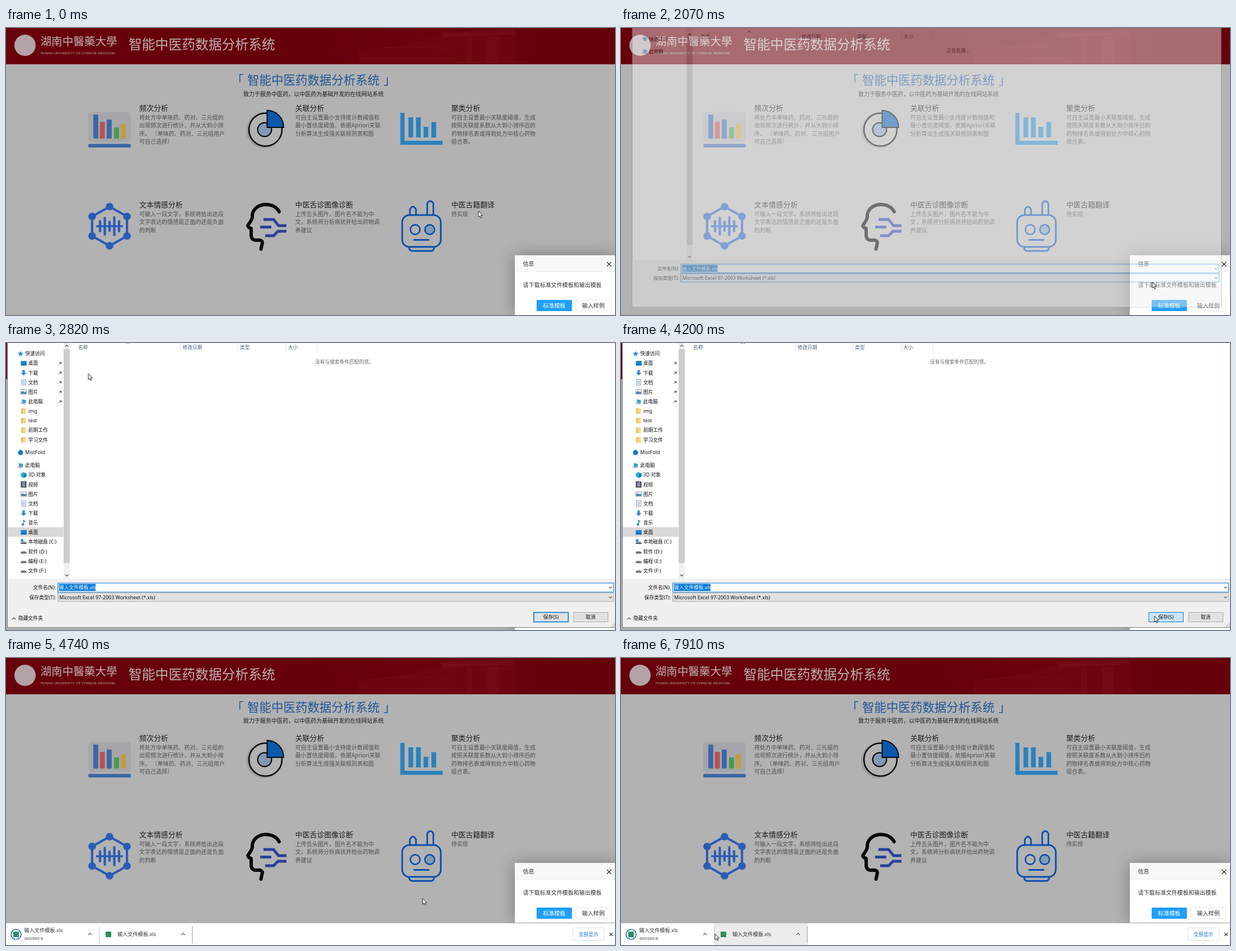
An HTML page that plays this animation: 1088 px wide and 514 px high, repeating every 7.99 s.

```html
<!DOCTYPE html>
<html lang="zh-CN">
<head>
<meta charset="utf-8">
<title>智能中医药数据分析系统</title>
<style>
html,body{margin:0;width:100%;height:100%;overflow:hidden;background:#b2b2b2}
svg{display:block;width:100vw;height:100vh}
text{font-family:"Noto Sans","Noto Sans CJK SC","Noto Sans CJK",sans-serif;white-space:pre}
.cjk text{font-family:"Noto Sans CJK SC","Noto Sans CJK",sans-serif}
</style>
</head>
<body>
<svg id="stage" viewBox="0 0 1088 514" preserveAspectRatio="none"></svg>
<script>
const LOOP = 7990;

// y is the vertical middle of the line
const T = (x, y, s, size, fill, anchor = 'start', weight = 400) =>
  `<text x="${x}" y="${(y + size * .37).toFixed(2)}" font-size="${size}" fill="${fill}" text-anchor="${anchor}" font-weight="${weight}">${s}</text>`;
const R = (x, y, w, h, fill, extra = '') =>
  `<rect x="${x}" y="${y}" width="${w}" height="${h}" fill="${fill}" ${extra}/>`;
const C = (x, y, r, fill, extra = '') =>
  `<circle cx="${x}" cy="${y}" r="${r}" fill="${fill}" ${extra}/>`;
const L = (d, stroke, w = 1, extra = '') =>
  `<path d="${d}" fill="none" stroke="${stroke}" stroke-width="${w}" ${extra}/>`;
const F = (d, fill, extra = '') => `<path d="${d}" fill="${fill}" ${extra}/>`;
const G = (id, body, extra = '') => `<g id="${id}" ${extra}>${body}</g>`;
const cross = (x, y, r, c, w) => L(`M${x - r} ${y - r}l${2 * r} ${2 * r}m0 ${-2 * r}l${-2 * r} ${2 * r}`, c, w);
const chev = (x, y, r, up, c = '#444') => L(`M${x - r} ${y + (up ? r : -r) / 2}l${r} ${up ? -r : r}l${r} ${up ? r : -r}`, c, 1.1);

function header() {
  return R(0, 0, 1088, 65, 'url(#red)') +
    F('M630 65V42Q700 34 745 22L790 10H912V65Z', '#8a2026', 'opacity=".12"') +
    F('M775 8L905 2L912 11L782 17Z', '#8f2a2e', 'opacity=".2"') +
    R(822, 17, 11, 48, '#8f2a2e', 'opacity=".16"') + R(860, 15, 20, 50, '#8f2a2e', 'opacity=".16"') +
    L('M636 40Q720 28 800 38M632 54H800', '#8f3a3a', 1, 'opacity=".2"') +
    C(34, 31, 19, '#b3a3a5') +
    T(61.5, 24, '湖南中醫藥大學', 19.6, '#bdb0b1') +
    `<text x="61.5" y="47.3" font-size="6.25" fill="#b5a5a6" style="font-family:'Liberation Sans',sans-serif">HUNAN UNIVERSITY OF CHINESE MEDICINE</text>` +
    T(219, 29.5, '智能中医药数据分析系统', 23.8, '#bdb0b1', 'start', 350);
}

const cards = [
  ['频次分析', '将处方中单味药、药对、三元组的|出现频次进行统计，并从大到小排|序。 （单味药、药对、三元组用户|可自己选择）'],
  ['关联分析', '可自主设置最小支持度计数阈值和|最小置信度阈值，依据Apriori关联|分析算法生成强关联规则表和图'],
  ['聚类分析', '可自主设置最小关联度阈值，生成|按照关联度系数从大到小排序后的|药物排名表或得到处方中核心药物|组合表。'],
  ['文本情感分析', '可输入一段文字，系统将给出这段|文字表达的情感是正面的还是负面|的判断'],
  ['中医舌诊图像诊断', '上传舌头图片，图片名不能为中|文，系统将分析病状并给出药物调|养建议'],
  ['中医古籍翻译', '待实现']
].map(([head, body], i) => {
  const x = 238 + (i % 3) * 278.7, y = i < 3 ? 143 : 316;
  return T(x, y, head, 12.95, '#1c1c1c', 'start', 350) +
    body.split('|').map((s, k) => T(x, y + 17.3 + k * 14.3, s, 10.05, '#4e4e4e', 'start', 300)).join('');
}).join('');

function icons() {
  const bars = [[156, 155, '#3c66a6'], [167.7, 168, '#b8524e'], [180, 164, '#3c66a6'], [193, 178, '#479a52'], [205.3, 172, '#c39b42']];
  const freq = R(147, 150.5, 76, 54, '#a5a6a9', 'rx="6"') +
    bars.map(([x, y, c]) => R(x, y, 8.8, 198 - y, c, 'rx="1"')).join('') + R(147, 207.5, 76, 6.6, '#3c66a6', 'rx="2.5"');
  const pie = C(461, 183.5, 32, '#9d9d9d') + C(463.5, 182, 29.5, '#b2b2b2', 'stroke="#0a0a0a" stroke-width="2.6"') +
    C(462, 182, 12.4, '#8297b4', 'stroke="#0a0a0a" stroke-width="2.2"') +
    F('M466.5 178V147.5A30 30 0 0 1 496 178Z', '#0b58a8', 'stroke="#0a0a0a" stroke-width="2"');
  const chart = [[719, 160], [732.5, 160], [746, 177], [760, 168.5]].map(([x, y]) => R(x, y, 8.4, 196 - y, '#2a81bd')).join('') +
    F('M704.5 152H712V202H780V209.3H704.5Z', '#2a81bd');
  const blue = '#2a5cb6';
  const hex = Array.from({length: 6}, (_, i) => {
    const a = i * Math.PI / 3;
    return [185 + 36 * Math.sin(a), 355 - 35 * Math.cos(a)];
  });
  const net = L('M' + hex.join('L') + 'Z', blue, 4.2) + hex.map(p => C(p[0], p[1], 6.8, blue)).join('') +
    L('M161 355H209', blue, 3.4) +
    [9, 15, 8, 16, 9].map((h, i) => L(`M${168 + i * 8.5} ${355 - h}v${2 * h}`, blue, 4.2, 'stroke-linecap="round"')).join('');
  const head = L('M488 329C482 318 472 316 463 316C448 317 439 327 440 339C439 345 434 350 432 354Q433 358 438 359V372Q439 381 448 380Q458 379 458 385L455.5 396',
    '#080808', 6, 'stroke-linejoin="round" stroke-linecap="round"') +
    L('M460 343H478L487 354H501M454 356.5H474M463 372H478L486 364H501', '#2a3f9c', 5);
  const c = '#0b4fae';
  const bot = L('M721.5 335V325Q727 315 732.5 325V335M752.5 335V314Q758 306 763.5 314V335', c, 2.8) +
    R(707.8, 335, 69, 57, 'none', `rx="13" stroke="${c}" stroke-width="3"`) +
    L('M720 393Q721 399.3 726 399.3H759Q764 399.3 765 393', c, 3) +
    C(731, 361, 8.6, 'none', `stroke="${c}" stroke-width="2.6"`) + C(757, 361, 8.6, '#7d9db4', `stroke="${c}" stroke-width="2.6"`) +
    L('M729 379.5H755', c, 2.8, 'stroke-linecap="round"');
  return freq + pie + chart + net + head + bot;
}

const page = R(0, 65, 1088, 449, '#b2b2b2') + header() +
  G('title', T(403, 93, '「', 21.5, '#1f5699', 'start', 300) + T(431, 93, '智能中医药数据分析系统', 21.5, '#1f5699', 'start', 300) +
    T(674.5, 93, '」', 21.5, '#1f5699', 'start', 300) +
    T(424, 118, '致力于服务中医药，以中医药为基础开发的在线网站系统', 10.04, '#1e1e1e', 'start', 350)) +
  cards + icons();

const popup = R(909, 407, 179, 107, '#000', 'opacity=".32" filter="url(#soft)"') +
  R(909, 407, 180, 107, '#fff') + R(909, 407, 180, 30, '#f8f8f8') + R(909, 436, 180, 1, '#eee') +
  T(923.5, 422, '信息', 10.1, '#333', 'start', 350) + cross(1077.5, 423, 3.8, '#333', 1.3) +
  T(923.5, 460, '请下载标准文件模板和输出模板', 10.05, '#333', 'start', 350) +
  G('pick', R(948, 487, 63, 20, '#1e9fff', 'rx="1"') + T(979.5, 497, '标准模板', 10.1, '#fff', 'middle')) +
  R(1018, 487.3, 62.6, 19.4, '#fff', 'rx="1" stroke="#dedede" stroke-width=".8"') + T(1049.3, 497, '输入样例', 10.1, '#333', 'middle', 350);

const sheet = (x, y) => R(x - 5, y - 5, 10, 10, '#2f8f5b');
const bar = R(0, 475, 1088, 39, '#fff') +
  R(0, 475, 166, 39, '#ececec', 'id="hover1"') + R(167, 475, 166, 39, '#ececec', 'id="hover2"') +
  C(18, 495, 9, '#fff', 'stroke="#1f73c9" stroke-width="1.7"') + sheet(18, 495) +
  T(32.5, 488, '输入文件模板.xls', 9.2, '#333') + T(33, 502, '669/669 B', 7.1, '#444') + chev(150, 494.5, 3.2, true) +
  R(166, 480, 1, 31, '#ccc') + sheet(183, 495) + T(199, 494.5, '输入文件模板.xls', 9.2, '#333') + chev(316.5, 494.5, 3.2, true) +
  R(332.5, 480, 1, 31, '#999') +
  R(1012.5, 483.5, 56, 22.5, '#fff', 'rx="3" stroke="#d8dbe0" stroke-width="1"') + T(1040.5, 495, '全部显示', 8.75, '#1a73e8', 'middle') +
  cross(1081, 495, 2.8, '#444', 1.3);

const glyph = {
  star: (x, y) => F(`M${x} ${y - 5}l1.5 3.4 3.6.4-2.7 2.4.8 3.6-3.2-1.9-3.2 1.9.8-3.6-2.7-2.4 3.6-.4Z`, '#2a8fe0'),
  desk: (x, y) => R(x - 5, y - 4, 10.5, 8, '#1583d8') + R(x - 5, y + 2.5, 10.5, 1.5, '#0b5fa5'),
  down: (x, y) => F(`M${x - 2} ${y - 5}h4v5h3l-5 5-5-5h3Z`, '#2f86d6'),
  doc: (x, y) => R(x - 4, y - 5, 8, 10, '#f6f9fc', 'stroke="#7d93a8" stroke-width=".8"') + L(`M${x - 2.5} ${y - 2}h5m-5 2.2h5m-5 2.2h5`, '#6f9cc6', .9),
  pic: (x, y) => R(x - 5, y - 4, 10, 8, '#e9f2f8', 'stroke="#8a97a3" stroke-width=".8"') + F(`M${x - 4.4} ${y + 3.4}v-3l3-2 3 2 2.8-1v4Z`, '#4f87a8'),
  pc: (x, y) => F(`M${x - 3} ${y - 4}l7 1.4v6l-7-1.4Z`, '#3b97da') + F(`M${x - 5} ${y + 2}l8 2.2-2 1-7-2Z`, '#8796a3'),
  fold: (x, y) => R(x - 4, y - 5, 8, 10, '#f7d57c') + R(x - 4, y - 5, 2, 10, '#e3b64b'),
  cloud: (x, y) => C(x, y, 4.6, '#1b74c8'),
  cube: (x, y) => F(`M${x - 5} ${y - 3}l5-2 5 2v6l-5 2.5-5-2.5Z`, '#27b0dc') + F(`M${x} ${y - 1}l5-2v6l-5 2.5Z`, '#137fb3'),
  film: (x, y) => R(x - 5, y - 5.5, 10, 11, '#3f4550') + R(x - 2.8, y - 4, 5.6, 8, '#8294b5'),
  note: (x, y) => L(`M${x} ${y + 3}v-8q1 2.5 3 3.5`, '#1683d8', 1.4) + C(x - 1.6, y + 3.2, 2, '#1683d8'),
  disk: (x, y) => F(`M${x - 5} ${y + 1}l2-1.6h5l3 1.6v2.4h-10Z`, '#8a9096') + R(x - 5, y + 2, 10, 1.6, '#4d5358'),
  sys: (x, y) => glyph.disk(x, y) + R(x - 5, y - 5, 4.5, 4.5, '#2196e0')
};
const rows = ['star 快速访问', 'desk 桌面', 'down 下载', 'doc 文档', 'pic 图片', 'pc 此电脑', 'fold img', 'fold test', 'fold 前期工作', 'fold 学习文件',
  'cloud MistFold', 'pc 此电脑', 'cube 3D 对象', 'film 视频', 'pic 图片', 'doc 文档', 'down 下载', 'note 音乐', 'desk 桌面',
  'sys 本地磁盘 (C:)', 'disk 软件 (D:)', 'disk 编程 (E:)', 'disk 文件 (F:)'];
const tree = rows.map((row, i) => {
  const [kind, ...name] = row.split(' ');
  const y = 19 + i * 17.15 + (i > 9 ? 5.7 : 0) + (i > 10 ? 5.7 : 0);
  const dx = [0, 10, 11].includes(i) ? 0 : 5.5;
  const pin = i > 0 && i < 6 ? L(`M${93.5} ${y + 3}l3-3m-1.8-1.8l3.6 3.6`, '#777', 1) + R(95.6, y - 2.6, 3.6, 3, '#777', `transform="rotate(45 97 ${y})"`) : '';
  return glyph[kind](26 + dx, y) + T(34.3 + dx, y, name.join(' '), 8.75, '#111') + pin;
}).join('');

const button = (id, x, s, extra) => R(x, 482.5, 61.5, 17, '#e1e1e1', `id="${id}" ${extra}`) + T(x + 30.5, 491, s, 8.75, '#111', 'middle');
const dialog = R(2.5, -79, 1087.5, 588.5, '#fff', 'stroke="#777" stroke-width="1"') +
  R(3, 422, 1086.5, 87, '#f0f0f0') +
  R(103, -79, 11, 501, '#f0f0f0') + R(103, 11, 11, 383, '#cdcdcd') + chev(108.5, 5, 2.8, true) + chev(108.5, 416, 2.8, false) +
  [311, 414, 500, 556.5].map(x => R(x, -4, 1, 22, '#e4e4e4')).join('') + chev(218, 0, 2.8, true, '#777') +
  [[129, '名称'], [315.5, '修改日期'], [418, '类型'], [504, '大小']].map(([x, s]) => T(x, 8, s, 8.75, '#4c607a')).join('') +
  G('busy', T(33.6, 13, '快速访问', 8.75, '#111') + glyph.star(26, 13) + T(33.6, 36, '此电脑', 8.75, '#111') + glyph.pc(26, 36) + T(583, 34, '正在处理...', 8.75, '#555')) +
  G('ready', R(3, 330, 99.5, 17, '#d9d9d9') + tree + T(552, 34, '没有与搜索条件匹配的项。', 8.75, '#666') +
    chev(14, 493.5, 3, true) + T(22, 493, '隐藏文件夹', 8.75, '#111') +
    button('save', 943, '保存(S)', 'stroke="#0078d7" stroke-width="1.6"') + button('cancel', 1014, '取消', 'stroke="#adadad"') +
    [0, 1, 2].map(i => [...Array(i + 1)].map((_, k) => R(1086 - k * 2.6, 502 + i * 2.4, 1.3, 1.3, '#999')).join('')).join('')) +
  T(89, 438, '文件名(N):', 8.75, '#111', 'end') + T(89, 455.5, '保存类型(T):', 8.75, '#111', 'end') +
  R(92.5, 430, 993, 16, '#fff', 'stroke="#0078d7"') + R(94.5, 431.5, 65.5, 12.5, '#0078d7') + T(95, 437.8, '输入文件模板.xls', 8.75, '#fff') +
  R(92.5, 447.5, 993, 15.5, '#e1e1e1', 'id="kind" stroke="#adadad"') + T(95, 455.5, 'Microsoft Excel 97-2003 Worksheet (*.xls)', 8.9, '#111') +
  chev(1080, 438, 2.6, false) + chev(1080, 455.5, 2.6, false);

const stage = document.getElementById('stage');
stage.innerHTML = `<defs>
<linearGradient id="red"><stop offset="0" stop-color="#68000b"/><stop offset=".5" stop-color="#66000b"/><stop offset=".72" stop-color="#69020d"/><stop offset="1" stop-color="#64000a"/></linearGradient>
<filter id="soft" x="-50%" y="-70%" width="200%" height="240%"><feGaussianBlur stdDeviation="15"/></filter></defs>` +
  G('page', page, 'class="cjk"') + G('popup', popup, 'class="cjk"') + G('bar', bar) + G('dialog', dialog) +
  G('arrow', F('M0 0V10.6L2.5 8.4L4.2 12.2L5.9 11.4L4.3 7.7H7.3Z', '#fff', 'stroke="#111" stroke-width=".9"')) +
  G('hand', F('M2.3 6V1.2Q3.2-.4 4.1 1.2V4.6L8.2 5.6Q9.3 6.1 9 7.6L8.3 12H3.4L.2 7.8Q0 6.5 1.2 6.6L2.3 7.6Z', '#fff', 'stroke="#111" stroke-width=".9"'));
const el = id => document.getElementById(id);
const show = (id, on) => el(id).setAttribute('visibility', on ? 'visible' : 'hidden');

// pointer path: time, x, y
const path = [
  [0, 844, 328], [499, 844, 328], [500, 877, 357], [580, 877, 357],
  [960, 978, 501], [1300, 969, 493], [1730, 981, 497], [1810, 965, 481], [1890, 952, 461], [2030, 949, 455], [2150, 949, 455],
  [2450, 610, 300], [2820, 147, 55], [2900, 147, 55], [3300, 560, 330], [3670, 930, 500], [3740, 944, 494], [4200, 953, 489], [4440, 953, 489],
  [4520, 889, 452], [4900, 640, 415], [5200, 449, 422], [5510, 449, 422], [5740, 351, 504], [5820, 351, 504], [6100, 190, 496], [6290, 240, 486],
  [6370, 250, 486], [6740, 300, 496], [6910, 290, 495], [7160, 60, 490], [7420, 120, 459], [7680, 250, 480], [7910, 168, 494], [LOOP, 168, 494]
];
function pointer(t) {
  const i = Math.max(1, path.findIndex(k => k[0] > t));
  const [a, b] = [path[i - 1], path[i]];
  const u = (t - a[0]) / (b[0] - a[0]);
  return [a[1] + (b[1] - a[1]) * u, a[2] + (b[2] - a[2]) * u];
}

// dialog window: time, opacity, scale
const fades = [[0, 0, 1], [2030, .14, .955], [2070, .42, .968], [2150, 1, 1], [4380, .15, .96], [4440, 0, 1]];

function draw(t) {
  const [x, y] = pointer(t);
  const inside = (x0, y0, x1, y1) => x >= x0 && x <= x1 && y >= y0 && y <= y1;
  const docked = t >= 4520;
  el('title').setAttribute('transform', `translate(0 ${docked ? -5.3 : 0})`);
  el('popup').setAttribute('transform', `translate(0 ${docked ? -40 : 0})`);
  show('bar', docked);
  // children must stay hidden with their bar
  show('hover1', docked && inside(0, 475, 166, 514));
  show('hover2', docked && inside(167, 475, 333, 514));

  const [, alpha, scale] = fades.filter(f => f[0] <= t).pop();
  const loaded = t >= 2300;
  show('dialog', alpha > 0);
  el('dialog').setAttribute('opacity', alpha);
  el('dialog').setAttribute('transform', `translate(546 213) scale(${scale}) translate(-546 -213)`);
  el('busy').setAttribute('display', loaded ? 'none' : 'inline');
  el('ready').setAttribute('display', loaded ? 'inline' : 'none');
  const onSave = inside(943, 482, 1005, 500), onKind = inside(93, 447, 1086, 463);
  el('save').setAttribute('fill', onSave ? '#cce4f7' : '#e1e1e1');
  el('save').setAttribute('stroke-width', onSave ? 1 : 1.6);
  el('kind').setAttribute('fill', onKind ? '#e5f1fb' : '#e1e1e1');
  el('kind').setAttribute('stroke', onKind ? '#0078d7' : '#adadad');

  const link = (t >= 960 && t < 1810) || (t >= 4380 && t < 4520);
  el('pick').setAttribute('opacity', link ? .88 : 1);
  show('hand', link);
  show('arrow', !link && !(t >= 580 && t < 960));
  el(link ? 'hand' : 'arrow').setAttribute('transform', `translate(${x.toFixed(2)} ${y.toFixed(2)})`);
}

const start = performance.now();
function tick() {
  draw((performance.now() - start) % LOOP);
  requestAnimationFrame(tick);
}
tick();
</script>
</body>
</html>
```
